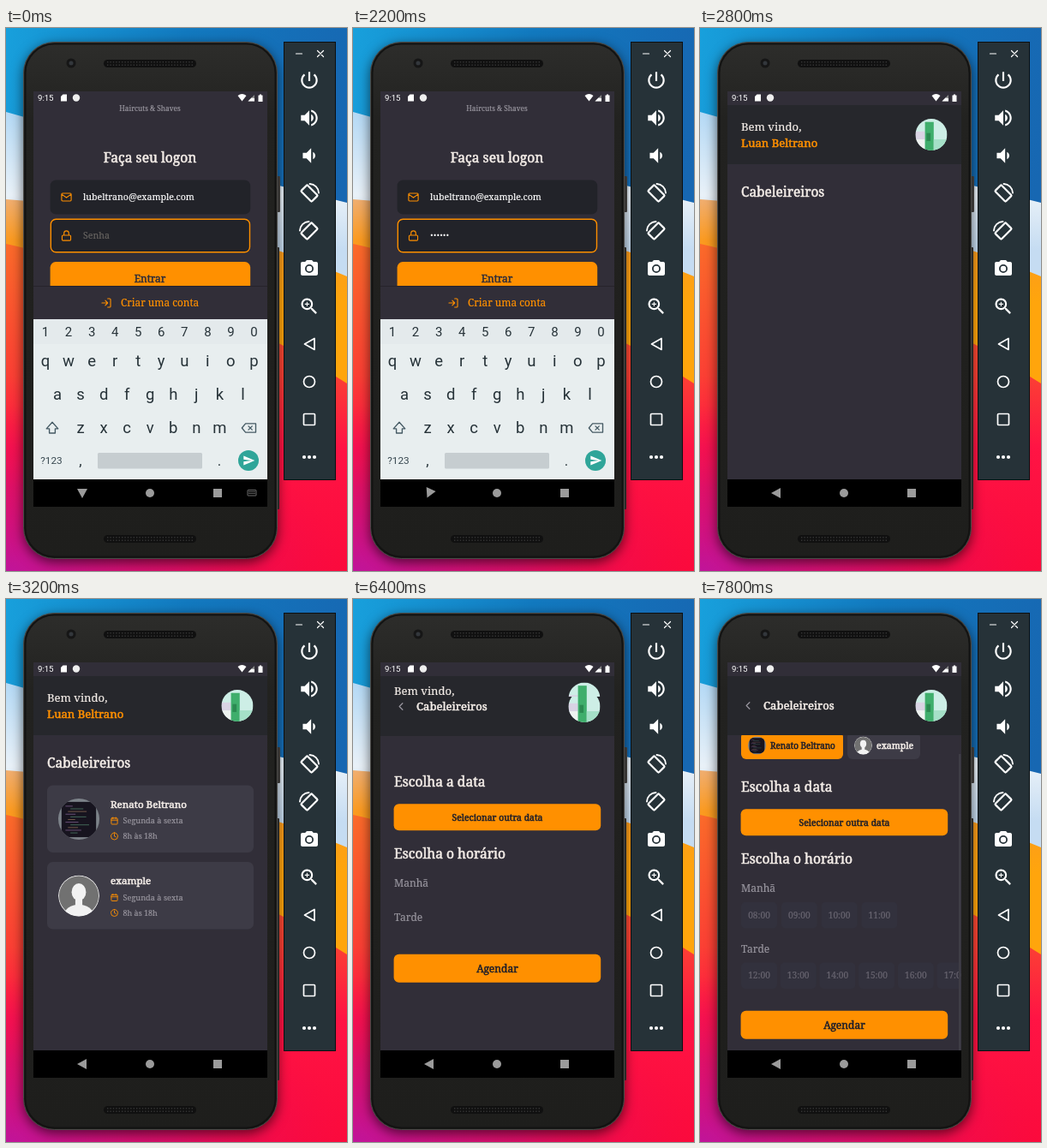
An HTML page for the animation above (8000 ms loop, 398 by 634 pixels).

```html
<!DOCTYPE html>
<html lang="pt">
<head>
<meta charset="utf-8">
<style>
  html, body { margin: 0; width: 100%; height: 100%; overflow: hidden; }
  svg { display: block; width: 398px; height: 634px; }
  text { font-family: "Noto Serif", serif; white-space: pre; stroke-width: .18px; }
  .medium { stroke-width: .55px; }
  .sans { font-family: Roboto, sans-serif; stroke: none; }
</style>
</head>
<body>
<svg id="stage" viewBox="0 0 398 634"></svg>
<script>
const ORANGE = '#ff9000', BG = '#312e38', HEADER = '#26272c', INPUT = '#222329',
      CARD = '#3d3b46', WHITE = '#f4ede8', GRAY = '#98959e';

// Drawing helpers; text is placed by its vertical middle and thickened by a thin outline.
const rect = (x, y, w, h, fill, r = 0, more = '') =>
  `<rect x="${x}" y="${y}" width="${w}" height="${h}" rx="${r}" fill="${fill}" ${more}/>`;
const circle = (x, y, r, fill, more = '') => `<circle cx="${x}" cy="${y}" r="${r}" fill="${fill}" ${more}/>`;
const text = (s, x, y, size, fill, more = '') =>
  `<text x="${x}" y="${y + size * 0.36}" font-size="${size}" fill="${fill}" stroke="${fill}" ${more}>${s}</text>`;
const MID = 'text-anchor="middle"', MEDIUM = 'class="medium"', SANS = 'class="sans"';
const group = (id, body, more = '') => `<g id="${id}" ${more}>${body}</g>`;
const at = (x, y, scale, body) => `<g transform="translate(${x} ${y}) scale(${scale})">${body}</g>`;
const solid = (d, x, y, scale, fill = '#fff') =>
  at(x, y, scale, `<path transform="translate(-12 -12)" fill-rule="evenodd" fill="${fill}" d="${d}"/>`);
const line = (d, x, y, scale, color = '#fff', width = 2) =>
  at(x, y, scale, `<path transform="translate(-12 -12)" fill="none" stroke="${color}" stroke-width="${width}"
    stroke-linecap="round" stroke-linejoin="round" d="${d}"/>`);

const ICON = {
  mail: 'M4 4h16a2 2 0 0 1 2 2v12a2 2 0 0 1-2 2H4a2 2 0 0 1-2-2V6a2 2 0 0 1 2-2zM22 6l-10 7L2 6',
  lock: 'M5 11h14a2 2 0 0 1 2 2v7a2 2 0 0 1-2 2H5a2 2 0 0 1-2-2v-7a2 2 0 0 1 2-2zM7 11V7a5 5 0 0 1 10 0v4',
  login: 'M15 3h4a2 2 0 0 1 2 2v14a2 2 0 0 1-2 2h-4M10 17l5-5-5-5M15 12H3',
  calendar: 'M5 4h14a2 2 0 0 1 2 2v14a2 2 0 0 1-2 2H5a2 2 0 0 1-2-2V6a2 2 0 0 1 2-2zM16 2v4M8 2v4M3 10h18',
  clock: 'M12 2a10 10 0 1 0 0 20a10 10 0 1 0 0-20zM12 6v6l4 2',
  back: 'M15 18l-6-6 6-6',
  power: 'M13 3h-2v10h2V3zm4.83 2.17l-1.42 1.42C17.99 7.86 19 9.81 19 12c0 3.87-3.13 7-7 7s-7-3.13-7-7c0-2.19 1.01-4.14 2.58-5.42L6.17 5.17C4.23 6.82 3 9.26 3 12c0 4.97 4.03 9 9 9s9-4.03 9-9c0-2.74-1.23-5.18-3.17-6.83z',
  louder: 'M3 9v6h4l5 5V4L7 9H3zm13.5 3c0-1.77-1.02-3.29-2.5-4.03v8.05c1.48-.73 2.5-2.25 2.5-4.02zM14 3.23v2.06c2.89.86 5 3.54 5 6.71s-2.11 5.85-5 6.71v2.06c4.01-.91 7-4.49 7-8.77s-2.99-7.86-7-8.77z',
  quieter: 'M18.5 12c0-1.77-1.02-3.29-2.5-4.03v8.05c1.48-.73 2.5-2.25 2.5-4.02zM5 9v6h4l5 5V4L9 9H5z',
  camera: 'M9 2L7.17 4H4c-1.1 0-2 .9-2 2v12c0 1.1.9 2 2 2h16c1.1 0 2-.9 2-2V6c0-1.1-.9-2-2-2h-3.17L15 2H9zm3 15a5 5 0 1 1 0-10a5 5 0 1 1 0 10zm0-1.8a3.2 3.2 0 1 0 0-6.4a3.2 3.2 0 1 0 0 6.4z',
  zoom: 'M15.5 14h-.8l-.3-.3A6.500 6.500 0 1 0 13.700 14.400l.3.3v.8l5 5L20.500 19zM9.500 14a4.500 4.500 0 1 1 0-9a4.500 4.500 0 1 1 0 9zM12 10h-2v2H9v-2H7V9h2V7h1v2h2z',
  send: 'M2 21L23 12 2 3v7l15 2-15 2z',
  shift: 'M12 4l-8 9h4v6h8v-6h4z',
  erase: 'M8 6h14v12H8l-5-6zM12 9.5l5 5M17 9.5l-5 5',
};

function wallpaper() {
  return rect(0, 0, 398, 634, 'url(#sky)') +
    `<path d="M0 98Q220 160 398 204V420H0z" fill="url(#haze)"/>
     <path d="M0 200Q220 215 398 290V440H0z" fill="url(#amber)"/>
     <path d="M0 252Q220 300 398 415V634H0z" fill="url(#flame)"/>` +
    rect(0, 440, 398, 194, 'url(#magenta)');
}

function phone() {
  const grille = y => rect(114, y, 108, 9, '#101010', 4.5) +
    [2.8, 6.2].map(dy => `<path d="M118 ${y + dy}H219" stroke="#333" stroke-width="1.4" stroke-dasharray="1.4 2"/>`).join('');
  return rect(315, 173, 5, 42, '#4a4846', 1) + rect(315, 256, 4, 306, '#3a3836', 1) +
    rect(20.5, 16.5, 296, 603, 'url(#shell)', 36, 'stroke="#4b4a47" style="filter:drop-shadow(0 4px 7px #0009)"') +
    rect(22.5, 18.5, 292, 599, 'none', 34, 'stroke="#131312" stroke-width="2"') +
    grille(37) + grille(592) + circle(76, 41, 5.5, '#161616') + circle(76, 41, 2.5, '#33373c');
}

function toolbar() {
  const x = 354;
  const rotate = y => `<rect x="-5.2" y="-8.8" width="10.4" height="17.6" rx="1.2" transform="translate(${x} ${y}) rotate(-45)"
    fill="none" stroke="#fff" stroke-width="2.2"/>` + line('M12.5 1.5a10.5 10.5 0 0 1 10 10', x, y, 1.05, '#fff', 1.8);
  return rect(324.5, 16.5, 60, 511, '#263238', 0, 'stroke="#0b0f11"') +
    line('M8.5 12h7', 342, 30, 1, '#fff', 1.2) + line('M8.5 8.5l7 7M15.5 8.5l-7 7', 367, 30, 1, '#fff', 1.2) +
    solid(ICON.power, x, 61, 1.08) + solid(ICON.louder, x, 105, 1.08) + solid(ICON.quieter, x, 149, 1.08) +
    rotate(193) + `<g transform="translate(${2 * x} 0) scale(-1 1)">${rotate(237)}</g>` +
    solid(ICON.camera, x, 281, 1) + solid(ICON.zoom, x, 325, 1.05) +
    line('M18 5.5v13L6.5 12z', x, 369, 1, '#fff', 1.7) + circle(x, 413, 6.5, 'none', 'stroke="#fff" stroke-width="1.7"') +
    rect(x - 6.5, 450.5, 13, 13, 'none', 1, 'stroke="#fff" stroke-width="1.7"') +
    [-6, 0, 6].map(dx => circle(x + dx, 501, 2.1, '#fff')).join('');
}

function statusBar() {
  return rect(32, 74, 273, 16, BG) + text('9:15', 37, 82, 9.6, '#fff', SANS) +
    `<path d="M66.5 77.5h4.5v8h-7v-5.5z" fill="#fff"/>` + circle(82, 81.5, 4.2, '#eee') +
    `<path d="M270.5 79q5-4 10 0l-5 6.5zM294.5 78.5h1.5v-1h2v1h1.5v7.5h-5z" fill="#fff"/>
     <path d="M290 78v7.5h-7.5z" fill="#888"/><path d="M290 82v3.5h-7.5l4-4z" fill="#fff"/>`;
}

function navBar() {
  const dots = [541.5, 543.5].map(y => `<path d="M283.5 ${y}h7" stroke="#aaa" stroke-dasharray="1 1"/>`).join('');
  return rect(32, 527, 273, 32, '#000') +
    group('backKey', '<path d="M-6 0L5-6V6z" fill="#9b9b9b"/>') +
    circle(168, 543, 5, '#9b9b9b') + rect(242, 538, 10, 10, '#9b9b9b') +
    group('imeKey', rect(282, 539.5, 10, 6.5, 'none', 0.5, 'stroke="#888" stroke-width=".8"') + dots);
}

function keyboard() {
  const row = (keys, x, y, size) =>
    [...keys].map((k, i) => text(k, x + 27.05 * i, y, size, '#263238', `${MID} ${SANS}`)).join('');
  return group('keyboard', rect(32, 340, 273, 187, '#e8eeef') + rect(32, 340, 273, 29, '#e4eaec') +
    row('1234567890', 46, 355, 15) + row('qwertyuiop', 46, 388, 18.5) +
    row('asdfghjkl', 60, 427, 18.5) + row('zxcvbnm', 87, 466, 18.5) +
    line(ICON.shift, 54, 467, 0.85, '#455a64', 1.6) + line(ICON.erase, 283, 467, 0.85, '#455a64', 1.6) +
    text('?123', 53, 505, 11.8, '#37474f', `${MID} ${SANS}`) + row(',', 87, 505, 17) + row('.', 249, 505, 17) +
    rect(107, 496, 122, 18.5, '#c6cdd0', 1.5) + circle(283, 505, 12, '#2fa599') + solid(ICON.send, 283.5, 505, 0.62));
}

function login() {
  const form =
    text('Awesome', 168, 114.5, 8.25, GRAY, MID) +
    circle(118, 152, 8, WHITE) + text('ZUTRIMOR', 177, 152, 17, WHITE, `${MID} ${SANS}`) +
    text('Haircuts &amp; Shaves', 168, 188, 8.25, GRAY, MID) +
    text('Faça seu logon', 168, 245, 15.6, WHITE, `${MID} ${MEDIUM}`) +
    rect(51.6, 271, 233.6, 40, INPUT, 6.6) + line(ICON.mail, 70.5, 291, 0.56, ORANGE) +
    text('lubeltrano@example.com', 90, 291, 10.6, '#fff') +
    rect(51.6, 316, 233.6, 40, INPUT, 6.6) +
    rect(52.3, 316.7, 232.2, 38.6, 'none', 6, `id="focus" stroke="${ORANGE}" stroke-width="1.4"`) +
    line(ICON.lock, 70.5, 336, 0.56, ORANGE) +
    text('', 90, 336, 11, '#fff', `id="password" ${SANS}`) + text('Senha', 90, 336, 10.6, '#666360', 'id="hint"') +
    rect(0, 328.5, 1.2, 14, '#0a9a86', 0, 'id="caret"') +
    group('enter', rect(51.6, 366.5, 233.6, 40, ORANGE, 6.6) + text('Entrar', 168, 386.5, 11.8, BG, `${MID} ${MEDIUM}`)) +
    text('Esqueci minha senha', 168.5, 431, 12, WHITE, MID);
  const footer = rect(32, 488, 273, 39, BG) + rect(32, 488, 273, 0.8, '#232129') +
    line(ICON.login, 117, 508, 0.56, ORANGE) + text('Criar uma conta', 134, 508, 11.8, ORANGE);
  return group('login', group('form', form) + group('footer', footer) + keyboard());
}

// Round pictures, drawn in a unit disc.
const disc = (x, y, r, body) => at(x, y, r, `<g clip-path="url(#disc)">${body}</g>`);
const userPhoto = () => disc(270, 124.5, 18.5,
  rect(-1, -1, 2, 2, '#cdeee6') + rect(-1, -0.2, 0.6, 0.5, '#d9d3e4') + rect(-1, 0.3, 0.6, 0.7, '#eef3f0') +
  rect(-0.4, -0.8, 0.55, 1.8, '#3fae6c') + rect(0.15, 0.3, 0.85, 0.7, '#a5e0c8') + rect(-0.3, -0.1, 0.25, 0.5, '#2b8a52'));
const codePhoto = (x, y, r) => disc(x, y, r, rect(-1, -1, 2, 2, '#7d838a') + rect(-0.84, -0.84, 1.68, 1.72, '#17141f') +
  Array.from({length: 11}, (_, i) => rect(-0.65 + i * 5 % 3 * 0.12, -0.65 + i * 0.13, 0.35 + i * 7 % 5 * 0.14, 0.04,
    ['#6a5079', '#436858', '#75594a'][i % 3])).join(''));
const blankPhoto = (x, y, r) => disc(x, y, r, circle(0, 0, 1, '#e6e6e6') + circle(0, 0, 0.96, '#717171') +
  `<ellipse cy=".93" rx=".7" ry=".5" fill="#f2f2f2"/>` + rect(-0.17, 0, 0.34, 0.6, '#f2f2f2') +
  '<ellipse cy="-.18" rx=".35" ry=".42" fill="#f2f2f2"/>');

function dashboard() {
  const card = (y, name, photo, under = '') => rect(48, y, 241, 78.5, CARD, 6.6) + under + photo(85, y + 39.5, 24) +
    text(name, 122, y + 22, 11.6, WHITE, MEDIUM) +
    line(ICON.calendar, 126.5, y + 41.5, 0.4, ORANGE, 2.3) + text('Segunda à sexta', 136.5, y + 41.5, 9.2, GRAY) +
    line(ICON.clock, 126.5, y + 59.5, 0.4, ORANGE, 2.3) + text('8h às 18h', 136.5, y + 59.5, 9, GRAY);
  const ripple = `<g clip-path="url(#card)">${
    group('ripple', rect(48, 217.5, 241, 78.5, '#37353f') + circle(165, 257, 115, '#3b3a41'))}</g>`;
  return group('dashboard', rect(32, 74, 273, 485, BG) + rect(32, 90, 273, 69, HEADER) +
    text('Bem vindo,', 48, 115.5, 13.1, WHITE) + text('Luan Beltrano', 48, 134, 13.1, ORANGE, MEDIUM) + userPhoto() +
    text('Cabeleireiros', 48, 191, 15.4, WHITE, MEDIUM) +
    group('cards', card(217.5, 'Renato Beltrano', codePhoto, ripple) + card(307, 'example', blankPhoto)));
}

function booking() {
  const button = (label, y, h, size) =>
    rect(47.6, y, 241.6, h, ORANGE, 6) + text(label, 168.5, y + h / 2, size, '#232129', `${MID} ${MEDIUM}`);
  const hours = (first, count, y, pitch) => `<g class="hours">` + Array.from({length: count}, (_, i) => {
    const x = 48 + i * pitch;
    return rect(x, y, 42, 30.5, '#32313d', 5) + text(`${first + i}:00`.padStart(5, '0'), x + 21, y + 15.3, 10.2, '#686570', MID);
  }).join('') + '</g>';
  const providers = group('providers',
    rect(48, 148, 119, 32, ORANGE, 6) + text('Renato Beltrano', 82, 164.5, 9.9, '#232129', MEDIUM) +
    rect(172, 148, 85, 32, CARD, 6) + text('example', 206, 164.5, 10.6, WHITE, MEDIUM) +
    group('faces', codePhoto(66.5, 164, 10.5) + blankPhoto(190.5, 164, 10.5)));
  const content = providers +
    text('Escolha a data', 48, 212, 15.6, WHITE, MEDIUM) + button('Selecionar outra data', 238.3, 31, 10.4) +
    text('Escolha o horário', 48, 296, 15.6, WHITE, MEDIUM) +
    text('Manhã', 48, 331, 12, GRAY) + hours(8, 4, 347, 46.8) +
    group('afternoon', text('Tarde', 48, 371, 12, GRAY) + hours(12, 6, 386.5, 45.7)) +
    group('submit', button('Agendar', 413.8, 33, 12));
  return group('booking', group('bookingBody', rect(32, 90, 273, 469, BG) + group('content', content) +
    rect(32, 90, 273, 69, HEADER) + line(ICON.back, 56, 124.5, 0.62, GRAY) +
    text('Cabeleireiros', 74, 124.5, 13.1, WHITE, MEDIUM) + userPhoto() +
    rect(302, 181, 2.5, 346, '#3f3d46', 0, 'id="scrollbar"')), 'clip-path="url(#reveal)"');
}

const gradient = (id, stops, more = 'x2="0" y2="1"') => `<linearGradient id="${id}" ${more}>` +
  stops.map(([offset, color, opacity = 1]) => `<stop offset="${offset}" stop-color="${color}" stop-opacity="${opacity}"/>`).join('') +
  '</linearGradient>';

const stage = document.getElementById('stage');
stage.innerHTML = `<defs>
  ${gradient('sky', [[0, '#18a0dc'], [0.5, '#1279bf'], [1, '#1767b2']], 'x2="1" y2=".25"')}
  ${gradient('haze', [[0, '#b4d9f5'], [0.3, '#e9f1f8'], [0.5, '#c5dcf2']])}
  ${gradient('amber', [[0, '#f0ae70'], [0.2, '#fb9a20'], [0.5, '#ffa50c']])}
  ${gradient('flame', [[0, '#fb6a2a'], [0.4, '#fb4034'], [0.62, '#ff1444'], [1, '#fb0a3c']])}
  ${gradient('shell', [[0, '#2d2d2b'], [0.15, '#222220'], [1, '#1e1e1c']])}
  <radialGradient id="magenta" cx="0" cy="1" r="1">
    <stop offset="0" stop-color="#c0149a"/><stop offset=".5" stop-color="#d41074" stop-opacity=".75"/>
    <stop offset="1" stop-color="#f00a50" stop-opacity="0"/></radialGradient>
  <clipPath id="screen">${rect(32, 74, 273, 485, '#000')}</clipPath>
  <clipPath id="card">${rect(48, 217.5, 241, 78.5, '#000', 6.6)}</clipPath>
  <clipPath id="reveal">${rect(32, 74, 273, 485, '#000', 0, 'id="revealBox"')}</clipPath>
  <clipPath id="disc"><circle r="1"/></clipPath></defs>` +
  wallpaper() + phone() + toolbar() +
  `<g clip-path="url(#screen)">${rect(32, 74, 273, 485, BG)}${login()}${dashboard()}${booking()}${statusBar()}${navBar()}</g>`;

const $ = id => document.getElementById(id);
const show = (el, on) => el.style.display = on ? '' : 'none';
const move = (id, y) => $(id).setAttribute('transform', `translate(0 ${y})`);

function render(t) {
  // Login: typing, then the keyboard closes and the form drops back.
  const typing = t < 2400, typed = Math.min(6, Math.floor((t - 200) / 200));
  show($('login'), t < 2800);
  show($('keyboard'), typing);
  show($('imeKey'), t < 2200);
  move('form', typing ? -93.5 : 0);
  move('footer', typing ? -187 : 0);
  show($('hint'), t < 400);
  $('password').textContent = t < 400 ? '' : t < 2200 ? '•'.repeat(typed - 1) + typed : '••••••';
  show($('caret'), t >= 400 && t < 2000);
  $('caret').setAttribute('x', 90 + 3.7 * (typed - 1) + 5.4);
  show($('focus'), t < 2600);
  $('enter').setAttribute('opacity', t >= 2400 && t < 2600 ? 0.86 : 1);
  const turn = t < 2200 ? -90 : t < 2400 ? -65 : t < 2600 ? -12 : 0;
  $('backKey').setAttribute('transform', `translate(89 543) rotate(${turn})`);

  // Dashboard: cards load, the first one is pressed, the page slides off.
  show($('dashboard'), t >= 2800 && t < 6600);
  show($('cards'), t >= 3200);
  show($('ripple'), t >= 5800 && t < 6000);
  move('dashboard', t < 6200 ? 0 : t < 6400 ? -2 : -8.5);

  // Booking: revealed from below, then providers and hours load and it scrolls.
  const loaded = t >= 6600, hours = t >= 7000, scrolled = t >= 7800;
  show($('booking'), t >= 6400);
  $('revealBox').setAttribute('y', loaded ? 74 : 114);
  move('bookingBody', t < 6600 ? 1 : t < 6800 ? 0.5 : 0);
  move('content', (loaded ? 32 : 0) - (scrolled ? 25 : 0));
  show($('providers'), loaded);
  show($('faces'), t >= 6800);
  document.querySelectorAll('.hours').forEach(el => show(el, hours));
  move('afternoon', hours ? 31 : 0);
  move('submit', hours ? 60 : 0);
  show($('scrollbar'), scrolled);
}

const start = performance.now();
function tick() {
  render((performance.now() - start) % 8000);
  requestAnimationFrame(tick);
}
tick();
</script>
</body>
</html>
```
